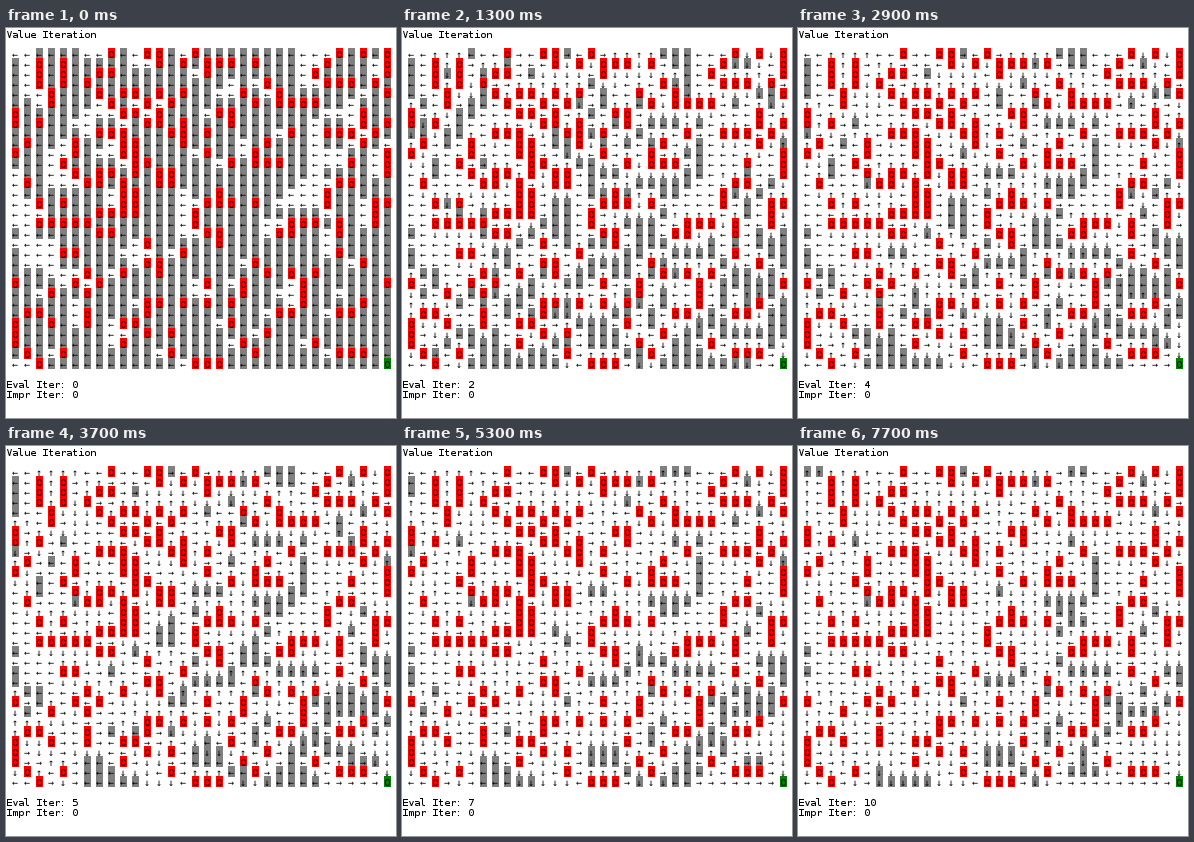
Recreate the animation shown at these times as a matplotlib script. Size 390 px wide and 390 px high, loop 8 s.

```python
import numpy as np
import matplotlib.pyplot as plt
from matplotlib.animation import FuncAnimation

SIZE, N = 390, 32
X0, Y0, DX, DY = 6, 20, 12, 10
LOOP, STEP = 8000, 100
GAMMA, SWEEPS = 0.9, 300
ARROWS = "←↓→↑"
GRAY, RED, GREEN = (128, 128, 128), (255, 0, 0), (0, 128, 0)

# Lake map: o is a hole, G the goal
LAKE = """
........ o..oo..o ........ ...o.o.o
..o.o... ....o.o. ooo.o... ..o....o
..o.o..o o....... o....... .o.....o
..o.o.o. ........ .....o.. ..ooo.o.
...o...o .oo.o.o. ...o..o. .......o
...o.... o..o.o.. ....o.oo oo......
o....... .oo.o... .oo..... .....o..
o.o..... ...oo.o. ..o..... .....o.o
.......o oo...oo. o......o ..ooo.o.
.o...o.. .oo...o. .....o.. .....o..
o....o.. .oo..... o...o... .......o
....o... ..oo.... ..o.ooo. ....o..o
.....o.o o.o.oo.. ........ .......o
.o....oo .o..oo.. ........ ...oo...
........ .oo..... .o...... ..o.....
..o.o... .oo..... ooo.o... ..o...oo
.......o ooo....o ........ ......o.
..ooooo. .......o .......o oo.o..o.
.......o o....... oo....oo ...o....
........ ...o.... .o...... ........
....oo.. ......o. ........ ...o....
........ ...oo... ....o... .....o..
......o. .o..o... .....o.o .o......
o....o.o ........ o..o.... o......o
...o..o. ........ ...o.... o.......
........ ...oo.o. o.o..... o....o..
.oo...o. ...o.... ......oo ...oo...
o..o..o. .oo..... ..o..... ........
o....... ...o.o.. .....o.. ........
o....... .o...... ...o.... .o......
.o..o... .....o.. ....o... ...ooo..
..o..... .......o oo...... .......G
"""
lake = np.array([list(row.replace(" ", "")) for row in LAKE.split("\n") if row])
hole, goal = lake == "o", lake == "G"


def sweep(value):
    """One synchronous backup; returns the new values and the greedy policy."""
    gain = GAMMA * value
    gain[hole], gain[goal] = -1, 1
    p = np.pad(gain, 1, mode="edge")
    near = [p[1:-1, :-2], p[2:, 1:-1], p[1:-1, 2:], p[:-2, 1:-1]]
    q = np.array([0.8 * near[a] + 0.1 * (near[a - 1] + near[(a + 1) % 4])
                  for a in range(4)])
    top = q.max(axis=0)
    # the first of equally good actions wins
    policy = np.argmax(q >= top - 1e-9 * np.abs(top), axis=0)
    return top, policy


def solve():
    value = np.zeros((N, N))
    policies = [np.zeros((N, N), int)]
    for _ in range(SWEEPS):
        value, policy = sweep(value)
        policies.append(policy)
    return policies


policies = solve()
best = policies[-1]


def backdrop(policy):
    img = np.full((SIZE, SIZE, 3), 255, np.uint8)
    for r in range(N):
        for c in range(N):
            if hole[r, c]:
                color = RED
            elif goal[r, c]:
                color = GREEN
            elif policy[r, c] != best[r, c]:
                color = GRAY
            else:
                continue
            x, y = X0 + DX * c, Y0 + DY * r
            img[y:y + 11, x:x + 7] = color
    return img


def row_text(policy, r):
    return " ".join("O" if hole[r, c] or goal[r, c] else ARROWS[policy[r, c]]
                    for c in range(N))


plt.rcParams.update({
    "font.family": "DejaVu Sans Mono",
    "font.size": 10,
    "text.hinting": "default",
    "text.hinting_factor": 1,
})
fig = plt.figure(figsize=(SIZE / 72, SIZE / 72), dpi=72, facecolor="white")


def label(x, y, text):
    return fig.text(x / SIZE, 1 - (y + 10) / SIZE, text, color="black",
                    ha="left", va="baseline")


picture = fig.figimage(backdrop(policies[0]), origin="upper")
label(0, 0, "Value Iteration")
rows = [label(X0, Y0 + DY * r, row_text(policies[0], r)) for r in range(N)]
counter = label(0, 350, "Eval Iter: 0")
label(0, 360, "Impr Iter: 0")


def update(i):
    t = i * STEP
    k = 0 if t < 500 else 1 + (t - 500) // 800
    picture.set_data(backdrop(policies[k]))
    for r, line in enumerate(rows):
        line.set_text(row_text(policies[k], r))
    counter.set_text(f"Eval Iter: {k}")
    return [picture, counter, *rows]


anim = FuncAnimation(fig, update, frames=LOOP // STEP, interval=STEP,
                     repeat=True, repeat_delay=0, blit=False)
plt.show()
```
